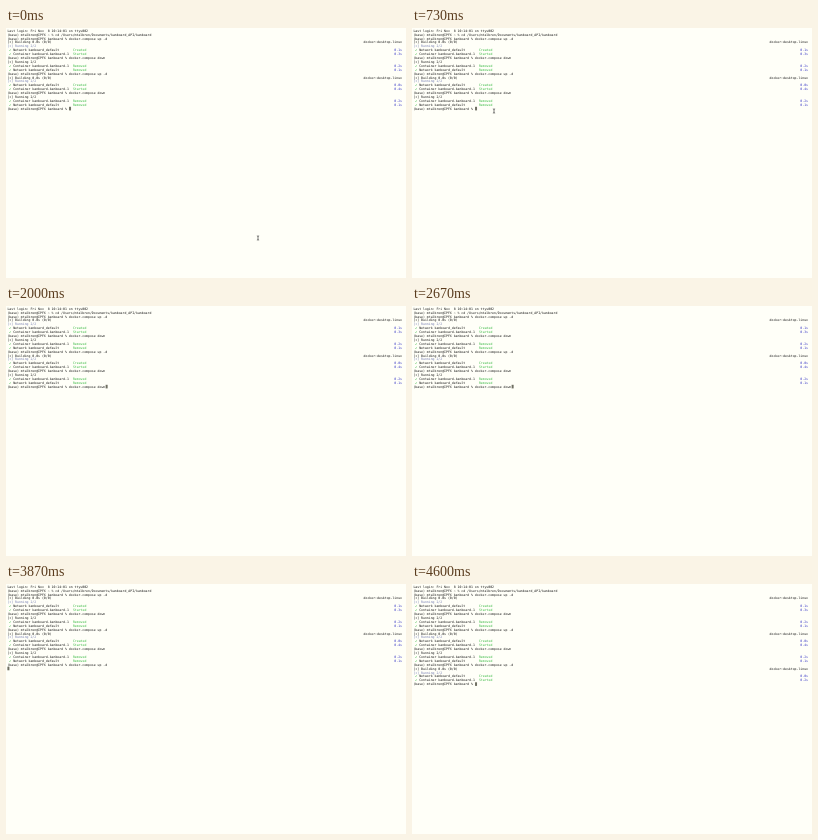
These frames come from a looping animation (400 px wide and 250 px high, 8 s). An HTML page:

```html
<!DOCTYPE html>
<html lang="en">
<head>
<meta charset="utf-8">
<title>Terminal</title>
<style>
  html, body { margin: 0; width: 100%; height: 100%; overflow: hidden; background: #fffff8; }
  svg { display: block; width: 400px; height: 250px; }
  text {
    font: 3.2px "DejaVu Sans Mono", "Liberation Mono", monospace;
    white-space: pre;
    text-rendering: geometricPrecision;
  }
</style>
</head>
<body>
<svg viewBox="0 0 400 250">
  <g id="screen"></g>
  <rect id="block" width="2" height="3.6" fill="#6f6f62"/>
  <path id="mouse" d="M-1.1-2.2Q0-2.2 0-1.4Q0-2.2 1.1-2.2M0-1.4V1.4M-1.1 2.2Q0 2.2 0 1.4Q0 2.2 1.1 2.2"
        fill="none" stroke="#444" stroke-width=".7"/>
</svg>
<script>
const LOOP = 8000, LEFT = 1.4, RIGHT = 396, CHAR = 1.926, PITCH = 3.9;
const INK = '#111', GREEN = '#2fb53a', BLUE = '#3434c4', PALE = '#7078b0';
const [screen, block, mouse] = ['screen', 'block', 'mouse'].map(id => document.getElementById(id));

const HOST = '(base) mtalbren@IPFX ';
const PROMPT = HOST + 'kanboard % ';
const UP = 'docker-compose up -d', DOWN = 'docker-compose down';
const NET = 'Network kanboard_default', BOX = 'Container kanboard-kanboard-1';

// A row is a list of [column, text, colour]; column -1 is flush right.
const plain = (s, colour = INK) => [[0, s, colour]];
const building = () => [[0, '[+] Building 0.0s (0/0)', INK], [-1, 'docker:desktop-linux', INK]];
const running = (count, colour) => plain('[+] Running ' + count, colour);
const item = (name, status, time, done = true) => [
  [1, done ? '✔' : '⠿', done ? GREEN : BLUE],
  [3, name, INK],
  [34, status, done ? GREEN : INK],
  [-1, time, BLUE]
];
const goUp = (netTime, boxTime) => [
  building(), running('2/2', PALE),
  item(NET, 'Created', netTime), item(BOX, 'Started', boxTime)
];
const goDown = () => [
  running('2/2', INK), item(BOX, 'Removed', '0.2s'), item(NET, 'Removed', '0.1s')
];

const history = [
  plain('Last login: Fri Nov  8 10:14:01 on ttys002'),
  plain(HOST + '~ % cd /Users/mtalbren/Documents/kanboard_API/kanboard'),
  plain(PROMPT + UP), ...goUp('0.1s', '0.3s'),
  plain(PROMPT + DOWN), ...goDown(),
  plain(PROMPT + UP), ...goUp('0.0s', '0.4s'),
  plain(PROMPT + DOWN), ...goDown()
];
const sent = plain(PROMPT + UP);
const made = item(NET, 'Created', '0.0s');

// [start, rows below the history, cursor column]
const steps = [
  [0, [plain(PROMPT)], 32],
  [2000, [plain(PROMPT + DOWN)], 51],
  [2930, [plain(PROMPT + UP)], 52],
  [3870, [sent, plain('')], 0],
  [4200, [sent, building(), plain('')], 0],
  [4270, [sent, building(), running('0/1', INK), item(NET, 'Creating', '0.0s', false), plain('')], 0],
  [4330, [sent, building(), running('1/2', INK), made, item(BOX, 'Creating', '0.0s', false), plain('')], 0],
  [4400, [sent, building(), running('1/2', INK), made, item(BOX, 'Starting', '0.1s', false), plain('')], 0],
  [4530, [sent, ...goUp('0.0s', '0.2s'), plain('')], 0],
  [4600, [sent, ...goUp('0.0s', '0.2s'), plain(PROMPT)], 32]
];

// The pointer jumps from place to place: [start, x, y]
const path = [
  [0, 252, 210], [270, 236, 198], [330, 180, 157], [400, 130, 119],
  [600, 112, 105], [670, 92, 90], [730, 82, 83], [800, 80.5, 83],
  [870, 79, 82.5], [930, 78, 82.5], [1000, 77, 82], [1070, 76, 82], [1200, 75, 82]
];

const latest = (table, t) => table.findLast(entry => entry[0] <= t);

function addRow(row, index) {
  for (const [col, s, colour] of row) {
    const text = document.createElementNS('http://www.w3.org/2000/svg', 'text');
    text.setAttribute('x', col < 0 ? RIGHT : LEFT + col * CHAR);
    text.setAttribute('y', 3.7 + index * PITCH);
    text.setAttribute('fill', colour);
    if (col < 0) text.setAttribute('text-anchor', 'end');
    text.textContent = s;
    screen.append(text);
  }
}

let shown;
function draw() {
  const t = performance.now() % LOOP;
  const step = latest(steps, t);
  if (step !== shown) {
    shown = step;
    const rows = [...history, ...step[1]];
    screen.replaceChildren();
    rows.forEach(addRow);
    block.setAttribute('x', LEFT + step[2] * CHAR);
    block.setAttribute('y', 0.8 + (rows.length - 1) * PITCH);
  }
  const [, x, y] = latest(path, t);
  mouse.setAttribute('transform', `translate(${x} ${y})`);
  mouse.setAttribute('visibility', t < 2000 ? 'visible' : 'hidden');
  requestAnimationFrame(draw);
}
draw();
</script>
</body>
</html>
```
